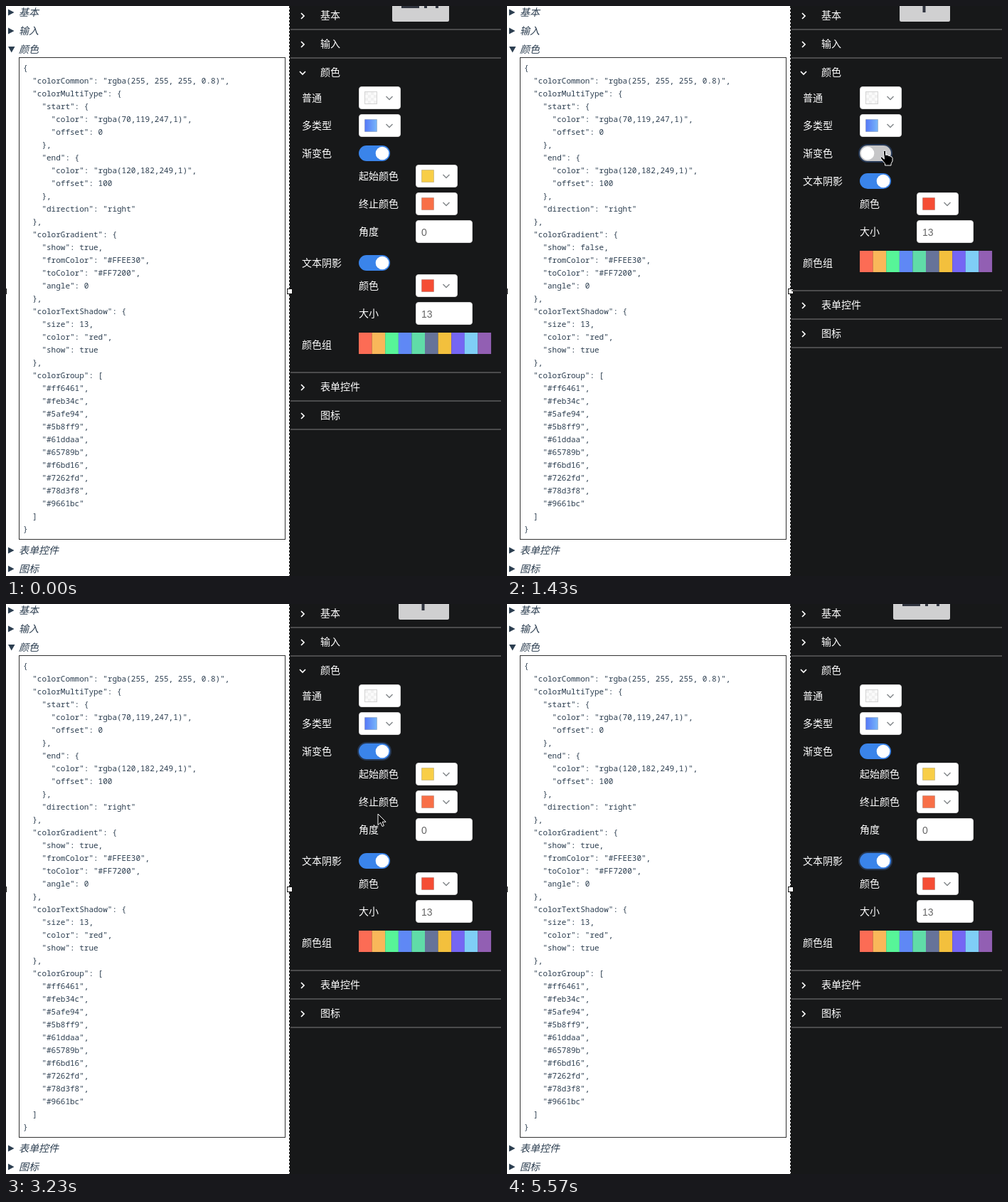
Animation, 696 px wide and 801 px high, one loop 5.64 s. Source, as an HTML page:

```html
<!DOCTYPE html>
<html lang="zh-CN">
<head>
<meta charset="utf-8">
<style>
  html, body { margin: 0; width: 100%; height: 100%; overflow: hidden; background: #fff; }
  svg { display: block; width: 696px; height: 801px; }
  text { font: 14px "Noto Sans CJK SC", "Noto Sans CJK", sans-serif; fill: #fff; }
  .summary { font-style: italic; font-weight: 500; fill: #2c3e50; }
  .code { font: 11px "Noto Sans Mono", monospace; fill: #2c3e50; white-space: pre; }
  .value { font: 14px "Liberation Sans", Arial, sans-serif; fill: #666; }
</style>
</head>
<body>
<svg id="stage" viewBox="0 0 696 801"></svg>
<script>
const LOOP = 5640;
const stage = document.getElementById('stage');

function add(parent, tag, attrs = {}, content = '') {
  const node = document.createElementNS('http://www.w3.org/2000/svg', tag);
  for (const key in attrs) node.setAttribute(key, attrs[key]);
  node.textContent = content;
  parent.append(node);
  return node;
}
const group = parent => add(parent, 'g');
const rect = (parent, x, y, width, height, fill, more) =>
  add(parent, 'rect', { x, y, width, height, fill, ...more });
const path = (parent, d, more) => add(parent, 'path', { d, ...more });
const label = (parent, x, y, content, cls = '') =>
  add(parent, 'text', { x, y: y + 5, class: cls }, content);
const stroke = (parent, d, color, width) =>
  path(parent, d, { fill: 'none', stroke: color, 'stroke-width': width });

// JSON side
const colors = ['#ff6461', '#feb34c', '#5afe94', '#5b8ff9', '#61ddaa',
  '#65789b', '#f6bd16', '#7262fd', '#78d3f8', '#9661bc'];

function jsonLines(gradientOn, shadowOn) {
  return JSON.stringify({
    colorCommon: 'rgba(255, 255, 255, 0.8)',
    colorMultiType: {
      start: { color: 'rgba(70,119,247,1)', offset: 0 },
      end: { color: 'rgba(120,182,249,1)', offset: 100 },
      direction: 'right'
    },
    colorGradient: { show: gradientOn, fromColor: '#FFEE30', toColor: '#FF7200', angle: 0 },
    colorTextShadow: { size: 13, color: 'red', show: shadowOn },
    colorGroup: colors
  }, null, 2).split('\n');
}

rect(stage, 0, 0, 696, 801, '#fff');
[['基本', 9], ['输入', 35], ['颜色', 61, true], ['表单控件', 765], ['图标', 791]]
  .forEach(([name, y, open]) => {
    path(stage, open ? `M3 ${y - 4}h9.5l-4.75 8.5z` : `M3 ${y - 4.5}v9l8.5 -4.5z`, { fill: '#2c3e50' });
    label(stage, 18, y, name, 'summary');
  });
rect(stage, 18.5, 72.5, 374, 677, 'none', { stroke: '#333' });
const codeLines = jsonLines(true, true).map((line, i) =>
  add(stage, 'text', { x: 24, y: 91 + 18 * i, class: 'code' }, line));

// Settings side
rect(stage, 399, 0, 297, 801, '#171819');
add(stage, 'line', { x1: 398.5, y1: 0, x2: 398.5, y2: 801, stroke: '#222', 'stroke-dasharray': '3 2' });
rect(stage, -6.5, 397.5, 7, 7, '#fff', { stroke: '#111' });
rect(stage, 395.5, 397.5, 7, 7, '#fff', { stroke: '#111' });

function section(parent, y, name, open) {
  stroke(parent, open ? `M413 ${y - 1}l4 4 4 -4` : `M415 ${y - 3}l4 4 -4 4`, '#fff', 1.7);
  label(parent, 442, y, name);
}
const divider = (parent, y) => rect(parent, 400, y - 1, 296, 2, '#4b4b4c');

function picker(parent, x, y, fill) {
  rect(parent, x + .5, y - 15.5, 58, 31, '#fff', { rx: 3.5, stroke: '#d9d9d9' });
  rect(parent, x + 8.5, y - 8.5, 17, 17, fill, { stroke: '#000', 'stroke-opacity': .16 });
  stroke(parent, `M${x + 38.5} ${y - 2}l4.5 4.5 4.5 -4.5`, '#85898c', 1.5);
}
function input(parent, y, value) {
  rect(parent, 576.5, y - 15.5, 79, 31, '#fff', { rx: 3.5, stroke: '#d9d9d9' });
  label(parent, 584, y + 1, value, 'value');
}
function makeSwitch(parent, y) {
  const ring = rect(parent, 494, y - 13, 48, 26, '#253753', { rx: 13 });
  const track = rect(parent, 496, y - 11, 44, 22, '', { rx: 11 });
  const knob = add(parent, 'circle', { cy: y, r: 9.3, fill: '#fff' });
  return (on, focused) => {
    const mix = (a, b) => Math.round(a + (b - a) * on);
    track.setAttribute('fill', `rgb(${mix(198, 58)},${mix(198, 132)},${mix(200, 234)})`);
    knob.setAttribute('cx', 507 + 22 * on);
    ring.style.display = focused ? '' : 'none';
  };
}

const defs = add(stage, 'defs');
const blend = add(defs, 'linearGradient', { id: 'blend' });
add(blend, 'stop', { offset: 0, 'stop-color': 'rgb(84,120,247)' });
add(blend, 'stop', { offset: 1, 'stop-color': 'rgb(120,182,249)' });

section(stage, 13, '基本');
divider(stage, 33);
section(stage, 53, '输入');
divider(stage, 73);
section(stage, 93, '颜色', true);
label(stage, 416, 129, '普通');
picker(stage, 496, 129, '#fafafa');
for (let i = 0; i < 8; i++)
  rect(stage, 505 + i % 4 * 4, 121 + (Math.floor(i / 4) * 2 + i % 2) * 4, 4, 4, '#f0f0f0');
label(stage, 416, 168, '多类型');
picker(stage, 496, 168, 'url(#blend)');
label(stage, 416, 207, '渐变色');
const setGradient = makeSwitch(stage, 207);

const gradientRows = group(stage);
label(gradientRows, 496, 239, '起始颜色');
picker(gradientRows, 576, 239, '#f8ce47');
label(gradientRows, 496, 278, '终止颜色');
picker(gradientRows, 576, 278, '#f86f47');
label(gradientRows, 496, 317, '角度');
input(gradientRows, 317, '0');

const shadowBlock = group(stage);
label(shadowBlock, 416, 361, '文本阴影');
const setShadow = makeSwitch(shadowBlock, 361);
const shadowRows = group(shadowBlock);
label(shadowRows, 496, 393, '颜色');
picker(shadowRows, 576, 393, '#f54d34');
label(shadowRows, 496, 432, '大小');
input(shadowRows, 432, '13');

const tail = group(shadowBlock);
label(tail, 416, 476, '颜色组');
['#fc6c55', '#f9b75a', '#57f598', '#5f88f5', '#60dca8', '#667399', '#f3c03d', '#7566f4', '#7fcef6', '#925fb3']
  .forEach((fill, i) => rect(tail, 496 + 18.6 * i, 459, 18.7, 30, fill));
divider(tail, 515);
section(tail, 535, '表单控件');
divider(tail, 555);
section(tail, 575, '图标');
divider(tail, 595);

// Clipped badge on the top edge, in two widths
function badge(x, marks) {
  const g = group(stage);
  rect(g, x, -10, 623 - x, 32, '#d0d0d1', { rx: 2.5 });
  marks.forEach(([left, width, height]) => rect(g, left, 0, width, height, '#30343f'));
  return g;
}
const wideBadge = badge(543, [[556, 25, 3], [588, 4, 3], [604, 4, 3]]);
const slimBadge = badge(552, [[584.5, 4, 9]]);

// Pointer
const outline = { fill: '#000', stroke: '#fff', 'stroke-linejoin': 'round' };
const pointer = group(stage);
const arrow = path(pointer, 'M0 0v15.5l3.6 -3.4 2.4 5.4 2.4 -1 -2.3 -5.3h5z', outline);
const hand = path(pointer, 'M-1.6 1.6a1.6 1.6 0 0 1 3.2 0v5l1.2 -.5 1.8 .6 .9 .8 2 .2 1 1 1.5 .3 1 1.5v4.5'
  + 'l-2 3.5v2.5h-8.5v-2.5l-3 -3.5 -3 -4c-1 -1.6 1 -2.7 2.3 -1.3l2.6 2.4z', outline);

// time, x, y
const track = [
  [120, 662, 2], [670, 543, 198], [810, 533, 205], [950, 531, 203], [1900, 531, 203],
  [1910, 526, 200], [2040, 526, 200], [2120, 523, 198], [2390, 523, 198], [2400, 522, 197],
  [2850, 522, 197], [3225, 523, 295], [3440, 519, 362], [4810, 519, 362], [5020, 534, 420], [LOOP, 534, 420]
];
function pointerAt(time) {
  const t = 120 + Math.floor((time - 120) / 69) * 69;
  const i = Math.max(1, track.findIndex(key => key[0] >= t));
  const [a, b] = [track[i - 1], track[i]];
  const k = (t - a[0]) / (b[0] - a[0]);
  return [a[1] + (b[1] - a[1]) * k, a[2] + (b[2] - a[2]) * k];
}

const within = (t, from, to) => t >= from && t < to;
const show = (node, visible) => { node.style.display = visible ? '' : 'none'; };
const shift = (node, y) => node.setAttribute('transform', `translate(0 ${y})`);
const slide = (t, start) => {
  const k = Math.min(1, Math.max(0, (t - start + 35) / 240));
  return k * k * (3 - 2 * k);
};
// A switch turned off and on again at the given times
const level = (t, off, on) => t < off ? 1 : t < on ? 1 - slide(t, off) : slide(t, on);

let lastState = '';
function draw(t) {
  const gradientOn = !within(t, 1160, 2610);
  const shadowOn = !within(t, 3640, 4260);
  setGradient(level(t, 1160, 2610), within(t, 1160, 3640));
  setShadow(level(t, 3640, 4260), t >= 3640);

  const state = `${gradientOn},${shadowOn}`;
  if (state !== lastState) {
    lastState = state;
    jsonLines(gradientOn, shadowOn).forEach((line, i) => { codeLines[i].textContent = line; });
    show(gradientRows, gradientOn);
    show(shadowRows, shadowOn);
    shift(shadowBlock, gradientOn ? 0 : -115);
    shift(tail, shadowOn ? 0 : -76);
  }

  const active = within(t, 120, 5570);
  show(slimBadge, active);
  show(wideBadge, !active);
  show(pointer, active);
  if (active) {
    const [x, y] = pointerAt(t);
    pointer.setAttribute('transform', `translate(${x} ${y})`);
    const overSwitch = within(t, 670, 2920) || within(t, 3370, 4880);
    show(hand, overSwitch);
    show(arrow, !overSwitch);
  }
}

const start = performance.now();
function tick() {
  draw((performance.now() - start) % LOOP);
  requestAnimationFrame(tick);
}
tick();
</script>
</body>
</html>
```
